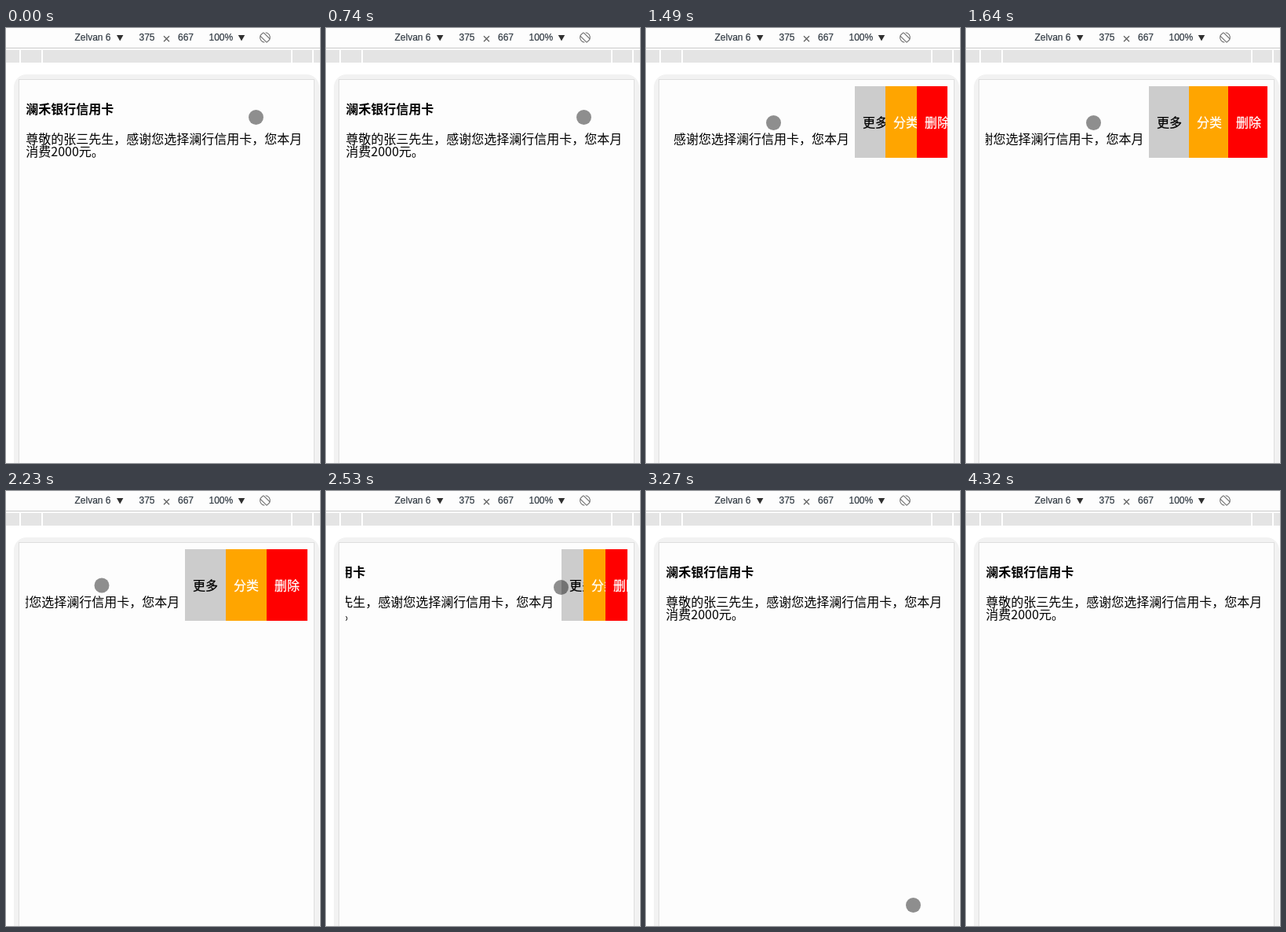
An HTML page for the animation above (4640 ms loop, 400 px wide and 553 px high).

```html
<!DOCTYPE html>
<html lang="zh-CN">
<head>
<meta charset="utf-8">
<title>Swipe actions</title>
<style>
  html, body { margin: 0; width: 100%; height: 100%; overflow: hidden; background: #fff; }
  svg { display: block; width: 400px; height: 553px; }
  text { white-space: pre; }
  .bar { font: 12px "Liberation Sans", Arial, sans-serif; fill: #303942; stroke: #303942; stroke-width: .2; }
  .cjk { font: 16px "Noto Sans CJK SC", "Noto Sans CJK", sans-serif; fill: #000; }
  .bold { font-weight: 700; }
</style>
</head>
<body>
<svg viewBox="0 0 400 553">
  <defs>
    <clipPath id="rowClip"><rect x="25" y="74" width="359" height="91"/></clipPath>
  </defs>

  <!-- toolbar -->
  <rect width="400" height="25" fill="#fdfdfd"/>
  <rect y="25" width="400" height="1" fill="#c8c8c8"/>
  <g class="bar">
    <text x="87.5" y="16">Zelvan 6</text>
    <text x="169.5" y="16">375</text>
    <text x="219" y="16">667</text>
    <text x="258.5" y="16">100%</text>
  </g>
  <path d="M141 9h8.4l-4.2 7.4zM295.8 9h8.4l-4.2 7.4z" fill="#303030"/>
  <path d="M201 10.3l7 7m0-7l-7 7" stroke="#666" stroke-width="1.4"/>
  <g transform="translate(330 12) rotate(-45)" fill="none" stroke="#666">
    <rect x="-3" y="-6" width="6" height="12" rx="1"/>
    <path d="M-3 -5.6A6.4 6.4 0 0 0 -5 4M3 5.6A6.4 6.4 0 0 0 5 -4"/>
  </g>

  <!-- width ruler -->
  <rect y="28" width="400" height="16" fill="#e4e4e4"/>
  <path d="M18 28v16M46 28v16M364 28v16M391 28v16" stroke="#fff" stroke-width="2"/>

  <!-- device -->
  <rect x="10" y="59" width="389" height="520" rx="16" fill="#f2f2f2"/>
  <rect x="16.5" y="65.5" width="376" height="510" fill="#fdfdfd" stroke="#dedede"/>

  <g clip-path="url(#rowClip)">
    <g id="row" class="cjk">
      <text class="bold" x="25.3" y="109">澜禾银行信用卡</text>
      <text x="25.3" y="147">尊敬的张三先生，感谢您选择澜行信用卡，您本月</text>
      <text x="25.3" y="163">消费2000元。</text>
    </g>
    <g id="panel"></g>
  </g>
  <circle id="touch" r="9.5" fill="#000" fill-opacity=".44"/>
</svg>
<script>
const LOOP = 4640, TICK = 148.9, LEAD = 8;   // ms; the picture advances once per tick
const RIGHT = 384, WIDTH = 156;              // right edge and full width of the actions
const SWIPE = 3.35, OPEN_AT = 8.736, CLOSE_AT = 16.376, ROW_LAG = .032;   // ticks
const LIFT = 29;                             // tick when the touch ends

const $ = id => document.getElementById(id);
const clamp = u => Math.min(1, Math.max(0, u));
const fastOut = u => u ** .6;
const slowIn = u => u ** 2;
const cubicOut = u => 1 - (1 - u) ** 3;

const home = { x: 318.5, y: 113.5 };
const glides = [
  { from: 3, to: 5, x: 328.5, y: 113.5, ease: fastOut },
  { from: 7, to: 9, x: 162.5, y: 120.5, ease: fastOut },
  { from: 13, to: 14, x: 122, y: 120, ease: fastOut },
  { from: 15, to: 16, x: 299.5, y: 122.5, ease: fastOut },
  { from: 20, to: 22, x: 340.5, y: 526.5, ease: slowIn },
  { from: 27, to: 28, x: 350.5, y: 547.5, ease: slowIn }
];

const actions = [
  ['更多', '#ccc', '#000'],
  ['分类', '#ffa500', '#fff'],
  ['删除', '#f00', '#fff']
];

function add(parent, tag, attrs, text = '') {
  const el = document.createElementNS('http://www.w3.org/2000/svg', tag);
  for (const key in attrs) el.setAttribute(key, attrs[key]);
  el.textContent = text;
  return parent.appendChild(el);
}

const buttons = actions.map(([label, back, ink]) => {
  const g = add($('panel'), 'g', { class: 'cjk' });
  add(g, 'rect', { y: 74, width: WIDTH, height: 91, fill: back });
  add(g, 'text', { x: 10, y: 126, style: `fill:${ink};stroke:${ink};stroke-width:.25` }, label);
  return g;
});

const move = (el, x, y = 0) => el.setAttribute('transform', `translate(${x} ${y})`);

function touchAt(tick) {
  return glides.reduce((p, g) => {
    const u = g.ease(clamp((tick - g.from) / (g.to - g.from)));
    return { x: p.x + (g.x - p.x) * u, y: p.y + (g.y - p.y) * u };
  }, home);
}

function openWidth(tick, closeAt) {
  const swipe = start => cubicOut(clamp((tick - start) / SWIPE));
  return WIDTH * (swipe(OPEN_AT) - swipe(closeAt));
}

function draw(ms) {
  const tick = Math.floor((ms + LEAD) / TICK);
  const { x, y } = touchAt(tick);
  move($('touch'), x, y);
  $('touch').setAttribute('visibility', tick < LIFT ? 'visible' : 'hidden');

  const open = openWidth(tick, CLOSE_AT);
  move($('row'), -openWidth(tick, CLOSE_AT + ROW_LAG));
  buttons.forEach((b, i) => move(b, Math.round(RIGHT - open * (3 - i) / 3)));
}

const start = performance.now();
function frame() {
  draw((performance.now() - start) % LOOP);
  requestAnimationFrame(frame);
}
frame();
</script>
</body>
</html>
```
